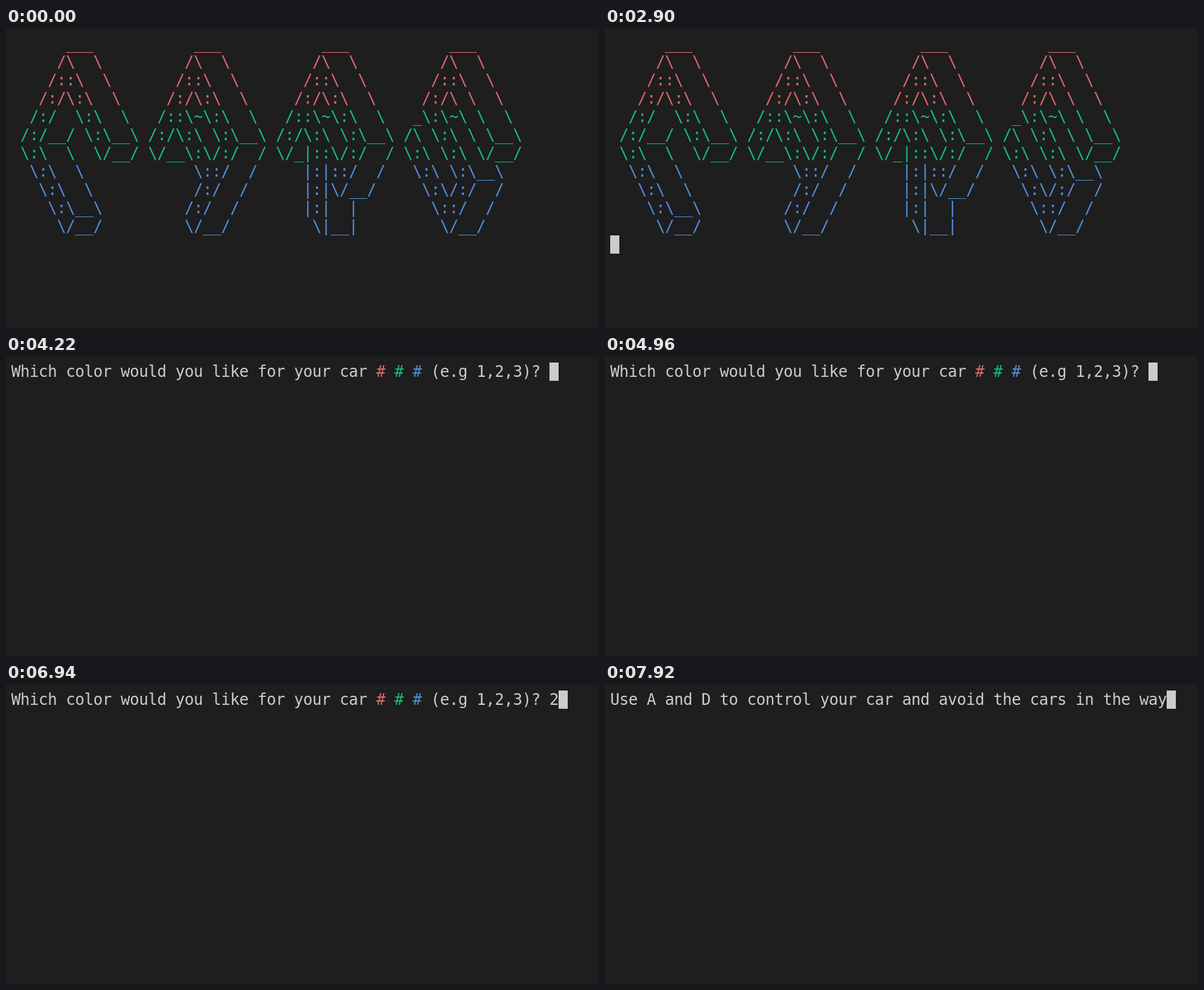
An HTML page for the animation above (8000 ms loop, 910 by 460 pixels).

```html
<!DOCTYPE html>
<html lang="en">
<head>
<meta charset="utf-8">
<title>Terminal</title>
<style>
  html, body { margin: 0; width: 100%; height: 100%; overflow: hidden; background: #1e1e1e; }
  pre {
    position: absolute; left: 8px; top: 10px; margin: 0; color: #ccc;
    font: 24px/28px "DejaVu Sans Mono", monospace;
    letter-spacing: -0.449px; /* snaps glyphs to the 14px cell grid */
    font-variant-ligatures: none;
  }
  #cursor { position: absolute; width: 14px; height: 28px; background: #ccc; }
  .r { color: #e06a68; }
  .g { color: #14c07c; }
  .b { color: #4f90dd; }
  [hidden] { display: none; }
</style>
</head>
<body>
<pre id="title">
<span class="r">      ___           ___           ___           ___
     /\  \         /\  \         /\  \         /\  \
    /::\  \       /::\  \       /::\  \       /::\  \
   /:/\:\  \     /:/\:\  \     /:/\:\  \     /:/\ \  \
</span><span class="g">  /:/  \:\  \   /::\~\:\  \   /::\~\:\  \   _\:\~\ \  \
 /:/__/ \:\__\ /:/\:\ \:\__\ /:/\:\ \:\__\ /\ \:\ \ \__\
 \:\  \  \/__/ \/__\:\/:/  / \/_|::\/:/  / \:\ \:\ \/__/
</span><span class="b">  \:\  \            \::/  /     |:|::/  /   \:\ \:\__\
   \:\  \           /:/  /      |:|\/__/     \:\/:/  /
    \:\__\         /:/  /       |:|  |        \::/  /
     \/__/         \/__/         \|__|         \/__/</span></pre>
<pre id="prompt" hidden>Which color would you like for your car <span class="r">#</span> <span class="g">#</span> <span class="b">#</span> (e.g 1,2,3)? <span id="answer">2</span></pre>
<pre id="help" hidden>Use A and D to control your car and avoid the cars in the way</pre>
<div id="cursor"></div>
<script>
const LOOP = 8000;
const $ = id => document.getElementById(id);
const screens = ["title", "prompt", "help"].map($);
const answer = $("answer"), cursor = $("cursor");

// Each step: start time, visible screen, cursor column and row
const steps = [
  { at: 0, screen: "title" },
  { at: 20, screen: "title", col: 0, row: 11 },
  { at: 4220, screen: "prompt", col: 59, row: 0 },
  { at: 6900, screen: "prompt", col: 60, row: 0, typed: true },
  { at: 7100, screen: "help", col: 61, row: 0 },
];

function render(time) {
  const step = steps.findLast(s => s.at <= time);
  for (const screen of screens) screen.hidden = screen.id !== step.screen;
  answer.hidden = !step.typed;
  cursor.hidden = step.col === undefined;
  if (!cursor.hidden) {
    cursor.style.left = 8 + 14 * step.col + "px";
    cursor.style.top = 10 + 28 * step.row + "px";
  }
}

function tick() {
  render(performance.now() % LOOP);
  requestAnimationFrame(tick);
}
tick();
</script>
</body>
</html>
```
